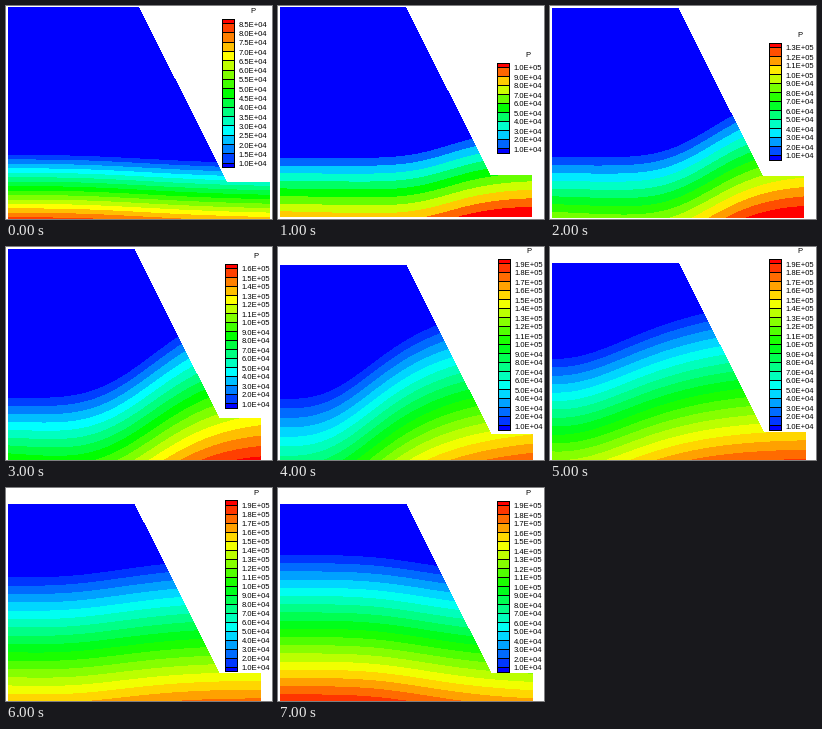
A matplotlib script for the animation above (8 s loop, 266 px wide and 213 px high).

```python
import matplotlib.pyplot as plt
import numpy as np
from matplotlib.animation import FuncAnimation
from matplotlib.colors import ListedColormap
from matplotlib.patches import Rectangle

W, H, DPI = 266, 213, 100
PX = 72 / DPI
LEFT = 2

# Key states in time; the states between them are interpolated.
KEY_TIMES = [0, 1, 3, 4, 5, 7]
KEYS = dict(
    top=[1, 1, 2, 18, 16, 16],                  # dam crest height
    scale=[1.04, 1, 1.003, 1.003, 1.008, 1.003],
    levels=[16, 10, 16, 19, 19, 19],
    step=[0.5, 1, 1, 1, 1, 1],                  # level step in 1e4
    front=[149, 152, 151, 152, 112, 67],        # first contour, left side
    rise=[-11, 30, 115, 102, 70, -24],          # its climb to the right
    middle=[0.65, 0.7, 0.65, 0.45, 0.45, 0.65],  # where it climbs
    sharp=[3, 7, 4, 3, 2.2, 4],                 # how sharply it climbs
    gap_left=[8.9, 7.6, 7.9, 9.5, 8.4, 8.2],    # contour spacing per 1e4
    gap_right=[8.9, 8.5, 10.4, 9.2, 9.4, 8.2],
    bar_x=[216, 219, 219, 220, 219, 219],
    bar_y=[12, 56, 16, 11, 11, 12],
    pitch=[9.3, 9, 9, 9, 9, 9],                 # legend row height
)

fig = plt.figure(figsize=(W / DPI, H / DPI), dpi=DPI, facecolor="white")
ax = fig.add_axes([0, 0, 1, 1])
X, Y = np.meshgrid(np.arange(W) + 0.5, np.arange(H) + 0.5)


def state_at(t):
    return {name: np.interp(t, KEY_TIMES, vals) for name, vals in KEYS.items()}


def palette(n):
    """Blue-cyan-green-yellow-red ramp for n levels."""
    t = np.linspace(0, 4, n + 1)
    ramp = [t - 2, np.minimum(t, 4 - t), 2 - t]
    return np.clip(ramp, 0, 1).T


def dam_mask(s):
    """Pixels inside the sloped dam and the ground beside it."""
    x, y = (X - LEFT) / s["scale"], (Y - s["top"]) / s["scale"]
    slope = 126 + 84.5 * y / 168
    inside = np.where(y < 168, x < slope, x < 252)
    return inside & (x > 0) & (y > 0) & (y < 210)


def pressure(s):
    """Level index: linear in depth below a front that climbs sideways."""
    u = np.clip((X - LEFT) / (252 * s["scale"]), 0, 1)
    climb = u ** s["sharp"] / (u ** s["sharp"] + s["middle"] ** s["sharp"])
    front = s["front"] - s["rise"] * climb
    gap = s["gap_left"] + (s["gap_right"] - s["gap_left"]) * u
    return 1 + (Y - front) / (gap * s["step"])


def draw_field(s, n, colors):
    band = np.clip(np.floor(pressure(s)), 0, n)
    ax.imshow(np.ma.masked_where(~dam_mask(s), band), vmin=-0.5, vmax=n + 0.5,
              cmap=ListedColormap(colors), extent=(0, W, H, 0),
              interpolation="nearest", aspect="auto")


def draw_legend(s, n, colors):
    left, top, pitch = s["bar_x"], s["bar_y"], s["pitch"]
    bottom = top + n * pitch
    marks = bottom - pitch * (np.arange(n) + 0.5)
    edges = np.floor(np.concatenate([[bottom], marks, [top]])) + 0.5
    for lo, hi, color in zip(edges, edges[1:], colors):
        ax.add_patch(Rectangle((left - 0.4, hi), 12, lo - hi, fc=color,
                               ec="black", lw=PX, antialiased=False))
    font = dict(family="Liberation Sans", size=7.7 * PX, color="black")
    for k, y in enumerate(marks):
        ax.text(left + 16.5, y + 4, f"{1e4 * (1 + k * s['step']):.1E}", **font)
    ax.text(left + 30.5, top - 4.8, "P", ha="center", **font)


def draw(i):
    ax.clear()
    s = state_at(i)
    n = round(s["levels"])
    colors = palette(n)
    draw_field(s, n, colors)
    draw_legend(s, n, colors)
    ax.set(xlim=(0, W), ylim=(H, 0))
    ax.axis("off")
    return []


anim = FuncAnimation(fig, draw, frames=8, interval=1000,
                     repeat=True, repeat_delay=0)
plt.show()
```
